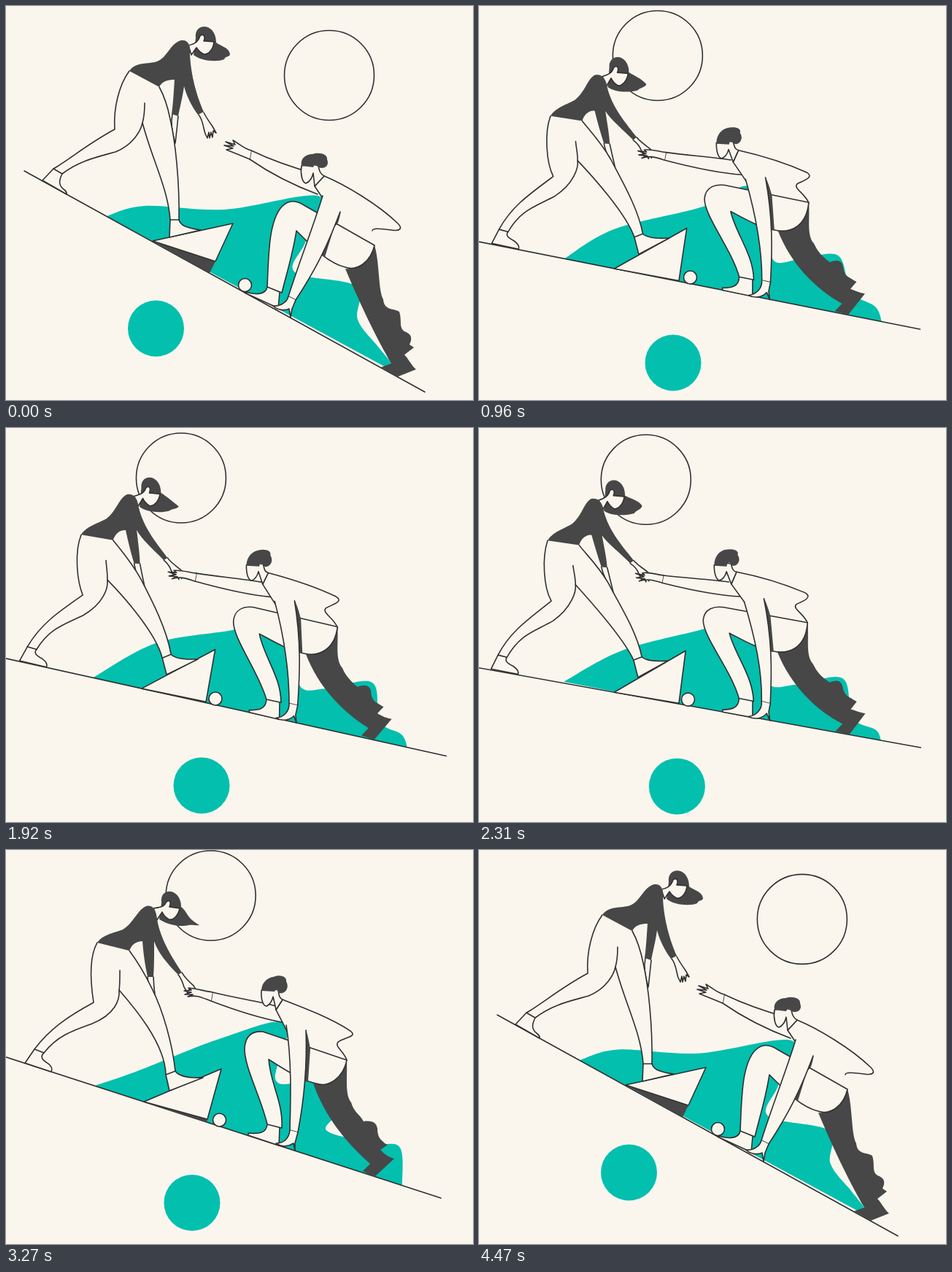
Recreate the animation shown at these times as an HTML page with a canvas. Size 640 by 540 pixels, loop 4.5 s.

```html
<!DOCTYPE html>
<html lang="en">
<head>
<meta charset="utf-8">
<title>Helping hand</title>
<style>
html, body { margin: 0; width: 100%; height: 100%; overflow: hidden; background: #faf6ee; }
canvas { display: block; }
</style>
</head>
<body>
<canvas id="stage" width="640" height="540"></canvas>
<script>
const LOOP = 4500, PAPER = '#faf6ee', DARK = '#474747', INK = '#303030', GREEN = '#03bfae';
const ctx = document.getElementById('stage').getContext('2d');
const NUMBER = /-?[\d.]+/g;

// time, woman tilt, man tilt, sun x y, green ball x y, pebble x y
const motion = [
  [0, 1, 1, 443, 95, 205.5, 442, 327.5, 382.5],
  [540, .45, .45, 320, 64, 250, 480, 299, 371],
  [960, .09, .09, 245, 68, 266, 489, 289.5, 372],
  [1150, .06, .06, 236, 70, 270, 491, 287, 372],
  [1635, .2, .2, 254, 65.5, 264, 488, 287, 371],
  [1920, .155, .155, 240, 68.5, 268, 490, 287, 371],
  [2250, .05, .05, 230, 70.5, 271, 491, 286.5, 372],
  [2730, 0, 0, 224, 72.5, 273, 492, 286.5, 372.5],
  [3270, .435, .435, 280.5, 62.5, 255, 483.5, 292.5, 370],
  [3990, .955, .89, 410, 80, 215, 453, 318.5, 377.5],
  [4250, 1, .98, 434, 90, 207, 443.5, 325, 381.5]
];

// time, then points along the hill's edge
const hill = [
  [0, 138,288, 190,274, 300,279, 430,261, 411,322, 396,365, 480,384, 482,430, 510,467, 528,490, 524,497],
  [960, 116,347, 185,306, 307,275, 370,247, 396,300, 404,349, 440,347, 492,342, 510,392, 543,412, 552,433],
  [1920, 118,343, 205,295, 310,277, 372,262, 397,305, 404,355, 440,357, 502,349, 512,402, 542,420, 550,438],
  [2730, 114,353, 185,315, 307,270, 366,242, 377,312, 392,343, 435,345, 485,337, 512,392, 547,408, 553,427],
  [3270, 122,323, 180,303, 295,258, 384,238, 370,316, 425,318, 452,358, 440,385, 505,402, 540,408, 543,460],
  [3990, 136,290, 215,273, 345,247, 361,266, 358,300, 440,343, 422,385, 475,415, 500,452, 517,478, 520,495]
];

// Smooth cyclic interpolation without overshoot
function track(rows, time) {
  const n = rows.length;
  const at = k => rows[(k + n) % n];
  const when = k => at(k)[0] + LOOP * Math.floor(k / n);
  let i = n - 1;
  while (rows[i][0] > time) i--;
  const span = when(i + 1) - when(i), u = (time - when(i)) / span;
  const slope = (k, c) => {
    const before = at(k)[c] - at(k - 1)[c], after = at(k + 1)[c] - at(k)[c];
    return before * after <= 0 ? 0 : (before + after) / (when(k + 1) - when(k - 1));
  };
  return rows[0].slice(1).map((_, j) => {
    const c = j + 1, a = at(i)[c], b = at(i + 1)[c];
    return a + (b - a) * u * u * (3 - 2 * u)
      + span * u * (1 - u) * ((1 - u) * slope(i, c) - u * slope(i + 1, c));
  });
}

// Each part is posed on a flat, a middle and a steep slope
function part(fill, ...poses) {
  const values = poses.map(pose => pose.match(NUMBER).map(Number));
  return { fill, shape: poses[0], values };
}

const MIDDLE = .435;
function posed({ shape, values: [flat, mid, steep] }, p) {
  const wFlat = (p - MIDDLE) * (p - 1) / MIDDLE;
  const wMid = p * (p - 1) / (MIDDLE * (MIDDLE - 1));
  const wSteep = p * (p - MIDDLE) / (1 - MIDDLE);
  let i = 0;
  return shape.replace(NUMBER, () => {
    const v = flat[i] * wFlat + mid[i] * wMid + steep[i] * wSteep;
    i++;
    return v.toFixed(2);
  });
}

const ground = part(null, 'M-12,331 L606,434', 'M-1,283.7 L596,477', 'M25,226 L574,529');

const wedge = [
  part(DARK, 'M185,364 L274,378 L273,378.5 Z', 'M189,345 L276,369 L275,373 Z', 'M201,322 L287,350 L279,366 Z'),
  part(PAPER, 'M185,364 L282,306 L274,378 Z', 'M189,345 L295,300 L276,369 Z', 'M201,322 L311,298 L287,350 Z')
];

const woman = [
  // far forearm
  part(PAPER, 'M165,192 C168,205 175,217 182,228 L178,212 L173,193',
    'M194,174 C195,190 199,200 205,206 L203,190 L202,174',
    'M228,148 C225,162 228,175 232,188 L234,170 L236,151'),
  // feet
  part(PAPER, 'M25,315 L16,334 L53,341 C54,338 52,334 46,330 C38,326 34,323 37,318',
    'M39,273 L26,292 L62,304 C64,300 63,297 58,293 C50,288 46,284 52,278',
    'M65,223 L50,239 L83,258 C83,257 84,255 80,252 C72,246 72,240 77,230'),
  part(PAPER, 'M211,319 L217,343 L257,320 C238,321 228,320 222,315',
    'M219,308 L224,330 L270,312 C245,313 236,309 232,303',
    'M225,293 L224,317 L267,307 C245,304 239,300 237,293'),
  // trousers
  part(PAPER, 'M91,157 C84,180 85,220 97,240 C60,270 40,285 25,315 L37,318 C55,285 75,282 100,267 C125,248 131,225 130,217 C150,240 195,290 211,319 L222,315 C215,280 190,245 175,215 C160,190 143,175 134,163',
    'M125,127 C112,150 117,190 120,209 C85,228 60,245 39,273 L52,278 C70,255 90,248 118,238 C150,225 156,205 155,192 C175,215 218,265 219,308 L232,303 C228,265 215,220 200,190 C188,165 178,150 169,138',
    'M169,89 C155,108 147,140 149,169 C110,190 85,212 65,223 L77,230 C100,212 125,207 150,200 C175,190 185,170 187,160 C200,210 222,250 225,293 L237,293 C238,240 232,185 225,155 C221,135 215,120 210,111'),
  part(null, 'M130,217 C130,207 127,198 126,191', 'M155,192 C156,185 156,175 156,165', 'M187,160 C190,150 190,140 190,133'),
  // hair
  part(DARK, 'M169,87 C168,67 196,67 196,94 C202,97 217,99 219,106 C218,112 211,113 209,118 C195,122 175,122 167,115 Z',
    'M213,72 C210,50 240,52 240,78 C250,86 246,92 265,103 C262,104 255,102 250,103 C240,106 222,103 210,95 Z',
    'M260,44 C257,22 288,22 288,50 C294,55 306,57 307,66 C307,70 301,68 299,73 C290,77 268,76 257,67 Z'),
  // face and neck
  part(PAPER, 'M175,87 C179,83 183,87 180,94 L195,95 C194,106 186,113 181,112 C176,109 174,106 172,102 L166,113 L160,101 C168,98 173,95 175,87 Z',
    'M219,72 C223,67 227,70 224,78 L238,80 C236,90 229,97 223,95 C218,92 215,88 214,85 L206,97 L202,80 C210,79 217,78 219,72 Z',
    'M266,41 C270,37 274,41 271,48 L285,49 C284,60 277,67 271,66 C266,64 263,60 261,57 L254,67 L250,54 C258,52 263,50 266,41 Z'),
  // top
  part(DARK, 'M91,157 C97,145 115,140 125,133 C138,122 140,104 150,99 C160,97 166,105 167,115 C175,145 195,165 209,183 L204,187 C190,172 172,160 165,150 C168,165 172,180 173,193 L165,192 C160,178 156,165 151,149 C143,148 136,155 134,163 Z',
    'M125,127 C132,116 150,113 160,109 C175,100 180,82 192,77 C203,74 206,85 207,95 C212,125 230,150 241,168 L236,171 C220,155 208,140 203,125 C203,145 203,160 202,174 L194,174 C190,155 188,140 187,125 C178,125 172,130 169,138 Z',
    'M169,89 C178,76 195,80 207,76 C222,70 224,52 240,47 C250,46 253,54 252,65 C253,95 262,125 271,145 L263,149 C255,138 248,125 244,110 C242,125 238,140 236,151 L227,148 C229,135 230,115 231,101 C222,101 214,103 210,111 Z'),
  // near hand
  part(PAPER, 'M204,187 C211,191 214,195 216,200 L220,209 L222,204 L226,212 L226,204 L230,211 L229,203 L233,207 L229,199 C222,193 214,189 209,183',
    'M236,171 C241,177 242,182 244,188 L249,196 L251,191 L254,199 L255,191 L258,198 L258,191 L262,195 L257,186 C250,180 245,175 241,168',
    'M264,149 C270,156 270,166 273,175 L276,181 L278,173 L279,181 L281,173 L283,180 L284,171 L288,174 L283,165 C278,158 274,152 271,146')
];

const man = [
  // back leg
  part(DARK, 'M449,265 C452,285 446,310 457,322 C463,334 470,341 481,347 C489,343 496,344 498,353 C501,366 508,366 513,370 L518,373 L510,384 C516,385 522,388 530,389 L509,418 L489,414 L499,404 C465,388 428,355 408,305 C425,308 446,296 449,265 Z',
    'M467,288 C468,310 464,335 473,346 C477,360 484,361 490,372 C502,370 508,374 509,382 C509,396 516,398 519,402 L523,404 L513,411 C518,416 524,421 532,423 L505,448 L489,440 L499,430 C465,400 437,365 421,320 C440,324 462,314 467,288 Z',
    'M505,328 C512,350 510,390 517,402 C518,418 532,414 539,419 C543,432 538,440 546,446 C558,450 556,458 553,464 L559,468 L546,478 C552,484 555,492 562,498 L537,508 L514,495 L528,490 C508,455 488,415 465,360 C482,362 498,350 505,328 Z'),
  // reaching arm and hand
  part(PAPER, 'M340,211 C310,208 280,206 250,203 L248,213 C285,222 325,230 358,231',
    'M370,214 C345,207 315,203 283,195 L281,207 C310,218 345,230 378,236',
    'M424,230 C395,222 365,212 336,198 L334,210 C360,228 395,246 427,258'),
  part(PAPER, 'M250,203 C240,202 232,198 222,200 L225,203 L212,200 L224,205 L213,206 L225,208 L217,211 C228,207 238,210 248,213',
    'M283,195 C270,193 262,190 250,189 L254,192 L244,193 L254,195 L245,198 L256,198 L249,201 C262,198 270,203 281,207',
    'M336,198 C325,195 320,189 311,184 L314,190 L301,186 L312,192 L299,191 L311,195 L302,197 C312,201 322,205 334,210'),
  // jacket
  part(PAPER, 'M364,240 L344,214 L351,197 C375,201 410,210 445,224 C456,230 445,236 434,240 C428,246 444,252 449,265',
    'M386,250 L370,219 L379,205 C405,215 445,230 472,248 C482,256 465,256 455,263 C450,270 462,274 467,288',
    'M433,262 L423,247 L436,233 C465,245 510,272 537,298 C544,305 540,309 528,307 C512,305 502,304 502,308 C502,315 504,322 505,328'),
  // foot and front leg
  part(PAPER, 'M356,370 C356,384 345,386 334,386 L334,389 L375,396 L375,373',
    'M358,376 C357,389 345,389 332,388 L332,391 L374,405 L375,381',
    'M358,385 C356,396 342,396 328,392 L327,393 L373,414 L375,393'),
  part(PAPER, 'M376,374 L356,370 C345,330 305,285 306,262 C308,247 322,244 335,246 L449,265 C447,300 425,310 400,305 C380,302 360,290 342,281 C350,310 375,340 376,374',
    'M378,381 L358,376 C350,340 325,295 327,270 C329,252 340,248 352,249 L467,288 C462,312 442,326 425,320 C405,316 380,300 360,287 C362,320 380,345 378,381',
    'M378,393 L358,385 C360,340 360,295 378,275 C388,265 398,266 410,274 L505,328 C500,350 482,364 465,358 C440,352 418,328 398,308 C393,340 385,365 378,393'),
  // shadow and supporting arm
  part(DARK, 'M389,232 C394,243 396,250 398,257 L403,305 L396,302 Z',
    'M411,246 C414,255 415,262 417,272 L414,317 L408,318 Z',
    'M459,282 C456,295 455,300 450,302 L437,344 L431,340 Z'),
  part(PAPER, 'M362,238 C378,290 388,330 387,374 L399,377 C401,330 401,290 389,233',
    'M384,240 C392,290 390,345 389,384 L400,387 C408,345 413,300 411,247',
    'M434,260 C422,300 402,350 387,398 L397,403 C425,360 440,330 458,282'),
  part(PAPER, 'M387,374 C388,385 380,393 369,395 C380,400 390,396 394,390 L399,400 L397,388 L399,377',
    'M389,384 C388,396 380,402 370,402 C378,408 388,406 394,402 L396,412 L396,402 L400,387',
    'M387,398 C385,406 376,412 366,411 C372,417 382,418 388,415 L390,427 L392,415 L397,403'),
  // face, hair
  part(PAPER, 'M320,188 C320,200 323,209 328,209 C333,207 336,201 337,197 L344,214 L351,197 C345,196 345,191 343,186 L336,185 Z',
    'M350,192 C349,204 352,214 357,214 C363,211 365,205 366,201 L370,219 L379,205 C374,203 374,198 373,192 L367,190 Z',
    'M405,219 C403,230 406,242 411,243 C418,240 420,234 421,229 L423,247 L436,233 C430,230 429,224 428,219 L421,217 Z'),
  part(DARK, 'M320,189 C320,176 327,169 334,167 C344,165 355,167 352,174 C358,182 350,191 344,188 C342,182 338,183 337,190 Z',
    'M350,193 C350,181 359,175 366,174 C375,170 385,173 384,180 C389,190 382,198 374,196 C372,190 369,191 368,194 Z',
    'M405,219 C403,208 412,203 420,203 C428,200 441,202 440,210 C444,220 435,224 428,221 C427,216 423,216 421,221 Z')
];

function paint(path, fill, stroke) {
  if (fill) { ctx.fillStyle = fill; ctx.fill(path); }
  if (stroke) { ctx.strokeStyle = stroke; ctx.stroke(path); }
}

function drawParts(parts, p) {
  for (const item of parts) {
    paint(new Path2D(posed(item, p)), item.fill, item.fill === DARK ? null : INK);
  }
}

function disc(x, y, r, fill, stroke) {
  const path = new Path2D();
  path.arc(x, y, r, 0, 2 * Math.PI);
  paint(path, fill, stroke);
}

function drawHill(time) {
  const v = track(hill, time), count = v.length / 2;
  const point = i => {
    const k = 2 * Math.max(0, Math.min(count - 1, i));
    return [v[k], v[k + 1]];
  };
  const path = new Path2D();
  path.moveTo(...point(0));
  for (let i = 0; i < count - 1; i++) {
    const [a, b, c, d] = [-1, 0, 1, 2].map(k => point(i + k));
    path.bezierCurveTo(b[0] + (c[0] - a[0]) / 6, b[1] + (c[1] - a[1]) / 6,
      c[0] - (d[0] - b[0]) / 6, c[1] - (d[1] - b[1]) / 6, ...c);
  }
  paint(path, GREEN);
}

function draw(time) {
  const [tilt, manTilt, sunX, sunY, ballX, ballY, pebbleX, pebbleY] = track(motion, time);
  ctx.fillStyle = PAPER;
  ctx.fillRect(0, 0, 640, 540);
  ctx.lineWidth = 1.6;
  ctx.lineJoin = ctx.lineCap = 'round';
  disc(sunX, sunY, 61.5, null, INK);
  drawHill(time);
  const slope = posed(ground, tilt);
  paint(new Path2D(slope + ' L640,700 L-20,700 Z'), PAPER);
  paint(new Path2D(slope), null, INK);
  disc(ballX, ballY, 38.5, GREEN);
  drawParts(wedge, tilt);
  disc(pebbleX, pebbleY, 9, PAPER, INK);
  drawParts(woman, tilt);
  drawParts(man, manTilt);
}

function tick() {
  draw(performance.now() % LOOP);
  requestAnimationFrame(tick);
}
tick();
</script>
</body>
</html>
```
